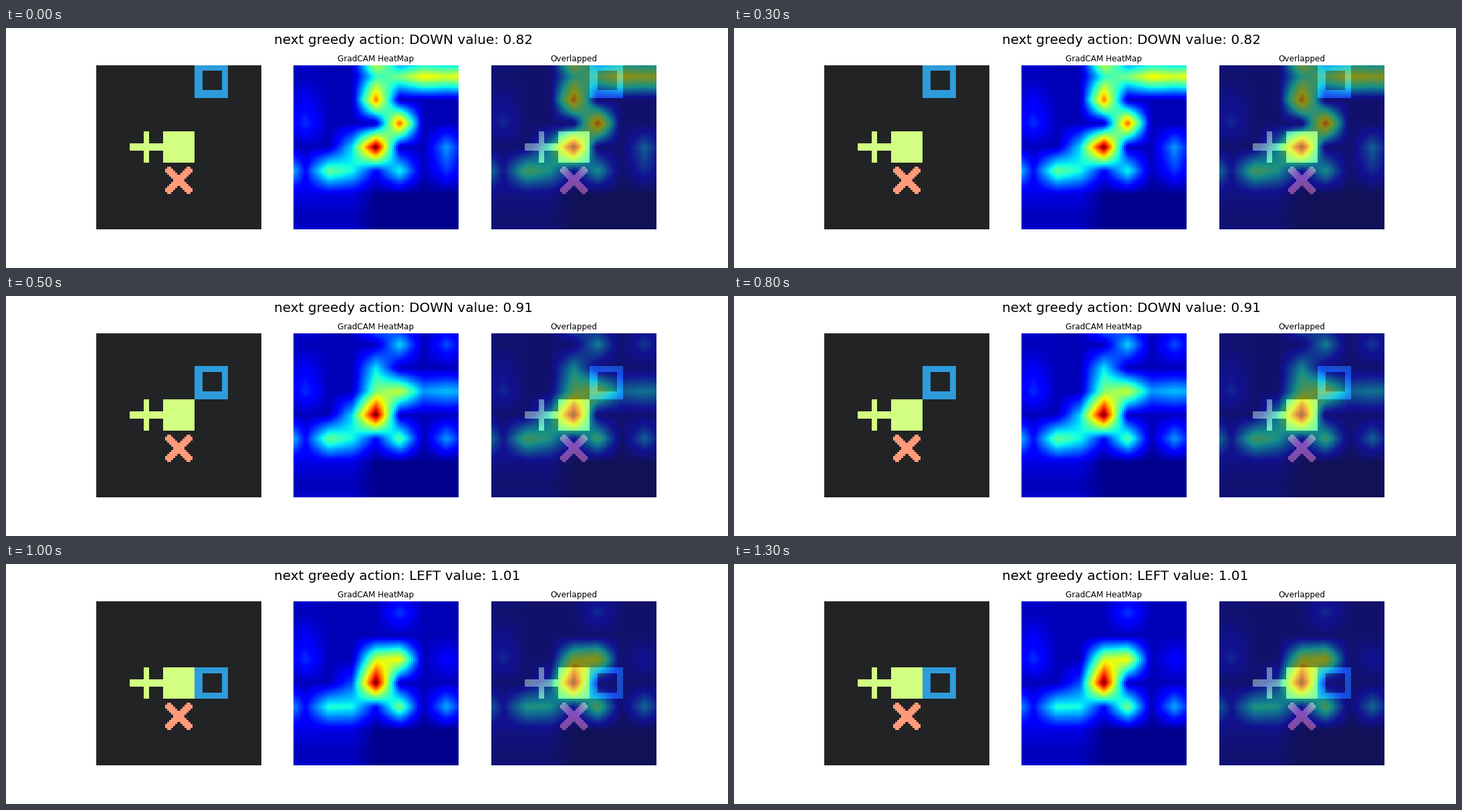
These frames come from a looping animation (1080x360 px, 1500 ms). A matplotlib script:

```python
import numpy as np
import matplotlib.pyplot as plt
from matplotlib.animation import FuncAnimation

W, H, DPI = 1080, 360, 72
N = 84          # pixels along one side of the board, which has 5 x 5 cells
G = 7           # side of the coarse activation grid
DARK, LIME = (34, 35, 36), (210, 255, 130)
BLUE, SALMON = (46, 156, 219), (255, 155, 122)

# Activation in percent at (row, column): spots that stay, then those that move
STEADY = {(3, 3): 106, (3, 2): 34, (4, 1): 48, (4, 2): 38,
          (1, 0): 11, (2, 0): 17, (4, 0): 13, (4, 3): 12}
STEPS = [
    ("DOWN", 0.82, {(0, 3): 40, (0, 4): 50, (0, 5): 67, (0, 6): 62, (1, 3): 80,
                    (2, 4): 82, (4, 4): 38, (3, 6): 28, (4, 6): 18}),
    ("DOWN", 0.91, {(0, 4): 34, (0, 6): 20, (1, 3): 36, (2, 3): 50, (2, 4): 60,
                    (2, 5): 28, (2, 6): 32, (4, 4): 46, (4, 6): 28}),
    ("LEFT", 1.01, {(0, 4): 18, (2, 3): 60, (2, 4): 66, (2, 6): 13, (3, 2): 20,
                    (4, 1): 40, (4, 4): 50, (4, 6): 30}),
]


def cell(i):
    """Pixel range of the i-th board row or column."""
    return slice(round(i * N / 5), round((i + 1) * N / 5))


def board(ring_row):
    img = np.full((N, N, 3), DARK, np.uint8)
    img[cell(2), cell(2)] = LIME
    img[cell(2), 24:27] = LIME
    img[40:44, cell(1)] = LIME

    d = np.arange(14) - 6.5
    dx, dy = np.meshgrid(d, d)
    diff, total = abs(dx - dy), abs(dx + dy)
    cross = ((diff <= 2) | (total <= 2)) & (np.maximum(diff, total) <= 12)
    img[52:66, 35:49][cross] = SALMON

    top = cell(ring_row).start
    img[cell(ring_row), cell(3)] = BLUE
    img[top + 3:top + 13, 54:64] = DARK
    return img


def heatmap(spots):
    """Bilinear enlargement of the coarse grid, mirrored at its borders."""
    grid = np.full((G, G), 5.0)
    grid[5, :3] = 9
    grid[5:, 3:] = 1.5
    for place, percent in {**STEADY, **spots}.items():
        grid[place] = percent
    padded = np.pad(grid / 100, 1, mode="reflect")
    pos = (np.arange(N) + 0.5) * G / N + 0.5
    weights = np.maximum(0, 1 - abs(pos[:, None] - np.arange(G + 2)))
    return weights @ padded @ weights.T


plt.rcParams["font.family"] = "DejaVu Sans"
fig = plt.figure(figsize=(W / DPI, H / DPI), dpi=DPI, facecolor="white")


def panel(index, title=""):
    side = 246.18
    ax = fig.add_axes([(135 + 1.2 * side * index) / W, 58 / H, side / W, side / H])
    ax.set_title(title, fontsize=12)
    ax.axis("off")
    return ax


plain, heat, mixed = panel(0), panel(1, "GradCAM HeatMap"), panel(2, "Overlapped")
blank = np.zeros((N, N))
jet = dict(cmap="jet", vmin=0, vmax=1, interpolation="nearest")
boards = [ax.imshow(board(0), interpolation="nearest") for ax in (plain, mixed)]
heats = [heat.imshow(blank, **jet), mixed.imshow(blank, alpha=0.5, **jet)]
caption = fig.text(400.6 / W, 1 - 24 / H, "", fontsize=20, va="baseline")


def update(i):
    action, value, spots = STEPS[i]
    for im in boards:
        im.set_data(board(i))
    for im in heats:
        im.set_data(heatmap(spots))
    caption.set_text(f"next greedy action: {action} value: {value:.2f}")
    return [*boards, *heats, caption]


anim = FuncAnimation(fig, update, frames=len(STEPS), interval=500, repeat=True)
plt.show()
```
